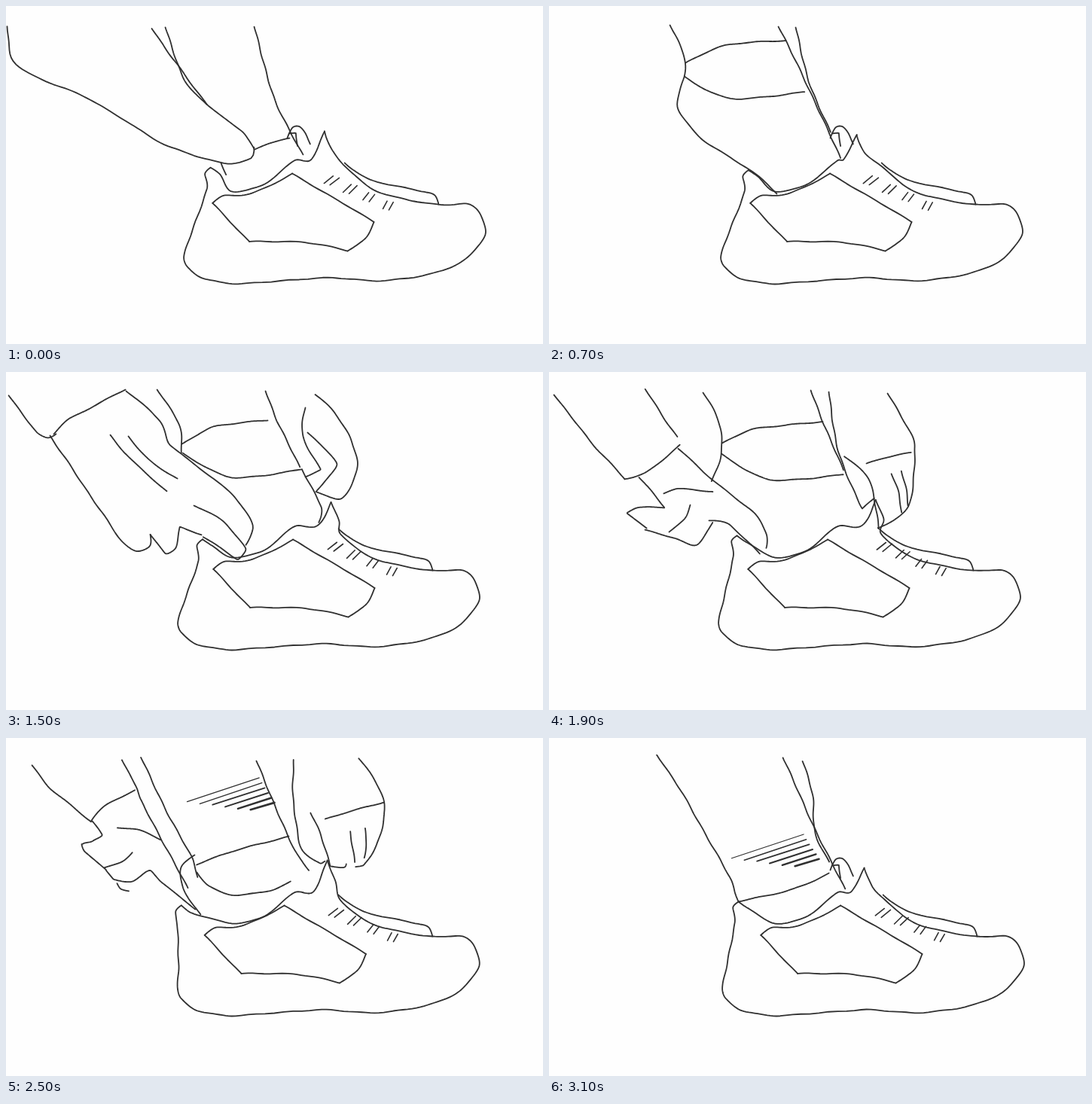
Write an HTML page with a canvas that moves like this. It is 713 px wide and 449 px high and loops after 3.2 s.

```html
<!DOCTYPE html>
<html lang="en">
<head>
<meta charset="utf-8">
<title>Putting on a shoe</title>
<style>
html, body { margin: 0; width: 100%; height: 100%; overflow: hidden; background: #fefefe; }
canvas { display: block; }
</style>
</head>
<body>
<canvas id="stage" width="713" height="449"></canvas>
<script>
const LOOP = 3200, STEP = 100, SAMPLES = 80, TOP = 22;
const ctx = document.getElementById('stage').getContext('2d');

// The shoe follows a few numbers per pose; limbs are key points, with strokes split by "/".
const poses = [
  { at: 0, shoe: { heelX: 272, heelY: 215, peakX: 423, peakY: 167, shift: 8, panel: 7, laces: 432 }, tab: true,
    leg: '2,27 8,70 35,92 103,120 150,147 215,186 290,209 325,203 329,188/330,28 357,125 394,197/330,191 350,182 377,176/286,209 292,224/212,28 235,95 267,131 315,168 329,190/194,30 225,75 267,131' },
  { at: 700, shoe: { heelX: 265, heelY: 218, peakX: 409, peakY: 171, shift: 0, panel: 0, laces: 427 }, tab: true,
    leg: '161,25 179,65 180,93 171,135 205,178 266,217 303,249/305,27 345,110 387,202/181,76 235,52 314,46/180,94 240,123 339,114/328,29 345,100 374,168' },
  { at: 1500, shoe: { heelX: 261, heelY: 222, peakX: 432, peakY: 173, shift: 0, panel: 8, laces: 437 },
    leg: '201,23 230,70 233,108/345,25 360,65 390,126/234,96 275,73 348,64/235,108 300,140 393,129//393,129 419,180 415,200',
    left: '4,31 40,80 55,87 66,82/58,84 150,220 172,238 190,232 192,216/192,216 212,241 225,234 231,206 260,216/63,82 85,62 159,23/160,25 205,65 218,97 300,162 328,205 318,230/250,177 290,200 318,235 308,249 262,219/138,84 170,120 213,158/162,85 190,117 228,142',
    right: '411,30 437,55 458,90 466,130 445,168 411,159/397,47 394,85 418,130 398,139/400,80 439,122 412,158' },
  { at: 1900, shoe: { heelX: 250, heelY: 217, peakX: 434, peakY: 170, shift: -3, panel: -3, laces: 445 },
    leg: '205,27 225,65 229,108 216,145/348,24 365,70 391,130/230,95 270,76 364,66/229,109 293,143 391,136',
    left: '7,30 55,92 101,142/120,140 154,180 118,180 103,187 130,208/128,210 165,220 195,230 217,200/101,142 130,133 174,97/172,102 225,150 270,185 289,215 288,234/212,197 240,203 280,242/152,161 170,155 217,159/188,177 180,195 160,212/128,23 150,57 170,86',
    right: '450,28 482,85 486,100 478,178 437,207/372,27 384,105 416,182 432,168/392,112 425,143 438,208/421,122 445,114 481,107/455,135 464,160 468,187/468,132 474,155 477,178' },
  { at: 2300, shoe: { heelX: 230, heelY: 226, peakX: 430, peakY: 163, shift: -1, panel: -6, laces: 432 },
    folds: { x: 336, y: 53 },
    leg: '186,26 225,105 250,152/336,28 380,140 399,163/250,148 300,128 374,115/250,150 265,175 310,193 370,183 401,165//250,155 233,172 235,200 258,234',
    left: '21,38 50,73 107,118/107,118 127,138 118,153 93,145 93,155 122,177/122,178 163,203 190,183 205,200 258,234/107,118 125,98 165,79/142,30 164,62 167,78 232,184/147,193 152,200 163,203/141,132 170,130 200,140/165,160 150,170 125,178',
    right: '478,26 517,90 494,166 483,165/395,28 390,110 393,155 425,167 430,155/422,110 441,192 466,180 467,165/428,112 455,103 517,88/462,130 466,155 467,172/484,124 486,145 482,166' },
  { at: 2800, shoe: { heelX: 237, heelY: 218, peakX: 421, peakY: 163, shift: 1, panel: 0, laces: 447 },
    leg: '170,27 215,125 258,198 261,233/328,35 375,140 408,194/258,198 320,178 378,155/260,220 285,232 342,230',
    left: '55,35 75,60 122,100/126,98 134,122 113,112 100,122 150,173/150,173 152,187 192,163 240,217/122,98 145,75 181,55/173,27 181,55 255,222//157,100 180,108 214,127/171,140 160,155 140,165',
    right: '455,30 482,80 470,150 437,181/363,31 366,80 413,178/379,83 400,105 429,170/418,102 437,96 478,81/449,115 453,140 457,155/465,115 468,135 465,150' },
  { at: 3100, shoe: { heelX: 252, heelY: 217, peakX: 419, peakY: 173, shift: 2, panel: 14, laces: 443 }, tab: true,
    folds: { x: 338, y: 128 },
    leg: '143,22 175,70 240,185 247,205 252,217/311,26 355,125 393,200/252,217 320,202 372,180//337,31 350,75 353,125 372,165' }
];
const slides = { leg: [0, 0], left: [-300, -345], right: [60, -345] };

const mix = (a, b, t) => a + (b - a) * t;
const mixPoint = (p, q, t) => [mix(p[0], q[0], t), mix(p[1], q[1], t)];
const distance = (p, q) => Math.hypot(q[0] - p[0], q[1] - p[1]);
const toPoints = text => text.split(' ').map(pair => pair.split(',').map(Number));

// Smooth curve through the points that keeps sharp turns sharp.
function flatten(points) {
  const slopes = points.map((p, i) => {
    const a = points[i - 1], b = points[i + 1];
    if (!a || !b) return [0, 0];
    const u = distance(a, p), v = distance(p, b);
    const cos = ((p[0] - a[0]) * (b[0] - p[0]) + (p[1] - a[1]) * (b[1] - p[1])) / (u * v);
    const k = Math.min(u, v) * Math.max(0, Math.min(1, cos * 2 + 0.2)) / (distance(a, b) || 1);
    return [(b[0] - a[0]) * k, (b[1] - a[1]) * k];
  });
  const curve = [points[0]];
  for (let i = 1; i < points.length; i++) {
    for (let j = 1; j <= 12; j++) {
      const t = j / 12, base = mixPoint(points[i - 1], points[i], t * t * (3 - 2 * t));
      const m0 = t * (1 - t) ** 2, m1 = t * t * (t - 1);
      curve.push(base.map((c, axis) => c + slopes[i - 1][axis] * m0 + slopes[i][axis] * m1));
    }
  }
  return curve;
}

function resample(curve) {
  const lengths = [0];
  for (let i = 1; i < curve.length; i++) lengths.push(lengths[i - 1] + distance(curve[i - 1], curve[i]));
  let i = 1;
  return Array.from({ length: SAMPLES }, (_, n) => {
    const d = lengths.at(-1) * n / (SAMPLES - 1);
    while (i < curve.length - 1 && lengths[i] < d) i++;
    return mixPoint(curve[i - 1], curve[i], (d - lengths[i - 1]) / (lengths[i] - lengths[i - 1] || 1));
  });
}

for (const pose of poses)
  for (const limb in slides)
    pose[limb] = pose[limb] && pose[limb].split('/').map(s => s && resample(flatten(toPoints(s))));

// A slightly unsteady pen line.
function ink(points, dx = 0, dy = 0, width = 1.8) {
  ctx.lineWidth = width;
  ctx.beginPath();
  for (const [x, y] of points)
    ctx.lineTo(x + dx + 0.5 * Math.sin(y * 0.17), y + dy + 0.5 * Math.sin(x * 0.13));
  ctx.stroke();
}
const curve = (points, dx, dy) => ink(flatten(points), dx, dy);

function drawShoe({ heelX, heelY, peakX, peakY, shift, panel, laces }) {
  const heel = [heelX, heelY], peak = [peakX, peakY], base = [228 + shift, 334];
  const sole = toPoints('232,346 255,362 300,369 420,361 490,365 560,355 605,334 628,303 622,277 604,263 566,264 510,254 473,240 444,214')
    .map(([x, y]) => [x + shift, y]);
  curve([heel, [heelX - 8, heelY + 8], [heelX - 5, heelY + 28], mixPoint(heel, base, 0.75), base, ...sole,
    [peakX + 10, peakY + 25], peak]);
  curve([heel, [heelX + 12, heelY + 9], [300, 246], [340, 238], [384, 205], [peakX - 18, 204], peak]);
  for (const side of ['267,262 283,252 320,249 373,223', '373,223 430,256 482,287', '482,287 470,309 447,325',
    '447,325 390,314 316,313', '316,313 267,262']) curve(toPoints(side), panel);
  curve(toPoints('442,208 475,231 550,247 562,252 566,264'), shift);
  for (let i = 0; i < 8; i++) {
    const pair = i >> 1, x = laces + pair * 25 + (i % 2 ? 4 : -4), y = 232 + pair * 11 + (i % 2 ? 1 : -1);
    const lean = 6 - pair;
    ink([[x - lean, y + 5], [x + lean, y - 5]], 0, 0, 1.6);
  }
}

function drawTab() {
  curve(toPoints('374,176 380,162 389,160 398,169 404,183'));
  curve(toPoints('376,170 385,169 387,186'));
}

// Trouser folds: shorter and heavier towards the bottom.
function drawFolds({ x, y }) {
  for (let i = 0; i < 6; i++) {
    const endX = x + i * 4, endY = y + i * 6.5, length = 96 - i * 13;
    ink([[endX - length, endY + length * 0.33], [endX, endY]], 0, 0, 1.2 + i * 0.3);
  }
}

// Strokes shared by both poses morph; a limb missing from one of them slides in or out.
function drawLimb(name, from, to, t) {
  const a = from[name], b = to[name], near = t < 0.5 ? a : b;
  if (!a && !b) return;
  const away = !a ? 1 - t : !b ? t : 0;
  const [dx, dy] = slides[name].map(d => d * away);
  const strokes = a && b ? near : a || b;
  strokes.forEach((stroke, i) => {
    if (!stroke) return;
    const morphs = a && b && a[i] && b[i];
    ink(morphs ? a[i].map((p, n) => mixPoint(p, b[i][n], t)) : stroke, dx, dy);
  });
}

function draw(now) {
  const time = Math.floor(now % LOOP / STEP) * STEP;
  const index = poses.findLastIndex(pose => pose.at <= time);
  const from = poses[index], to = poses[index + 1] || from;
  const t = to === from ? 0 : (time - from.at) / (to.at - from.at);
  const near = t < 0.5 ? from : to;
  const shoe = {};
  for (const key in from.shoe) shoe[key] = mix(from.shoe[key], to.shoe[key], t);

  ctx.fillStyle = '#fefefe';
  ctx.fillRect(0, 0, 713, 449);
  ctx.save();
  ctx.beginPath();
  ctx.rect(0, TOP, 713, 449 - TOP);
  ctx.clip();
  ctx.strokeStyle = '#303030';
  ctx.lineCap = ctx.lineJoin = 'round';
  drawShoe(shoe);
  if (near.tab) drawTab();
  if (near.folds) drawFolds(near.folds);
  for (const name in slides) drawLimb(name, from, to, t);
  ctx.restore();
}

const start = performance.now();
function tick() {
  draw(performance.now() - start);
  requestAnimationFrame(tick);
}
tick();
</script>
</body>
</html>
```
